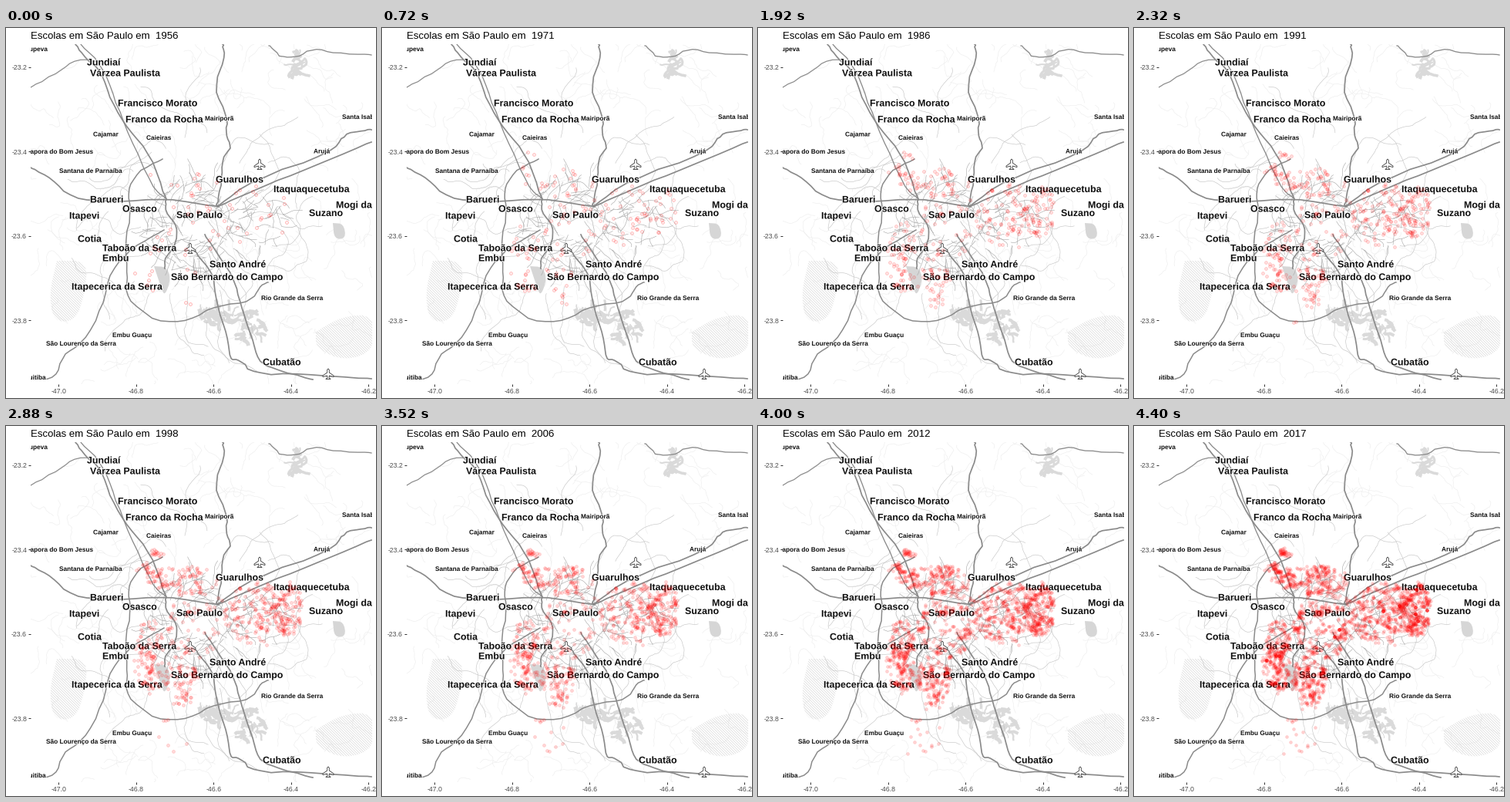
These frames come from a looping animation (480 by 480 pixels, 4.48 s). A matplotlib script:

```python
import numpy as np
import matplotlib.pyplot as plt
from matplotlib.animation import FuncAnimation
from matplotlib.collections import LineCollection
from matplotlib.patches import Polygon
from matplotlib.patheffects import withStroke

SIZE, DPI = 480, 72
LEFT, RIGHT, TOP, BOTTOM = 32, 474.5, 21, 462
FRAMES, STEP = 56, 80
CENTER = np.array([246, 258])
rng = np.random.default_rng(11)

plt.rcParams["font.family"] = "Liberation Sans"
plt.rcParams["hatch.linewidth"] = 0.6

fig = plt.figure(figsize=(SIZE / DPI, SIZE / DPI), dpi=DPI, facecolor="white")
ax = fig.add_axes([LEFT / SIZE, 1 - BOTTOM / SIZE,
                   (RIGHT - LEFT) / SIZE, (BOTTOM - TOP) / SIZE])
ax.set(xlim=(LEFT, RIGHT), ylim=(BOTTOM, TOP))
ax.spines[:].set_visible(False)
ax.set_xticks([68.3 + 100.5 * i for i in range(5)],
              [f"{-47 + 0.2 * i:.1f}" for i in range(5)])
ax.set_yticks([50.5 + 109.6 * i for i in range(4)],
              [f"{-23.2 - 0.2 * i:.1f}" for i in range(4)])
ax.tick_params(length=2.7, width=1, color="#333333", pad=2.2,
               labelsize=8.8, labelcolor="#4d4d4d")
title = fig.text(LEFT / SIZE, 1 - 14 / SIZE, "", size=13.2, color="black")


def smooth(pts, rounds=2):
    """Chaikin corner cutting that keeps both ends."""
    for _ in range(rounds):
        a, b = pts[:-1], pts[1:]
        mid = np.stack([0.75 * a + 0.25 * b, 0.25 * a + 0.75 * b], 1).reshape(-1, 2)
        pts = np.vstack([pts[:1], mid, pts[-1:]])
    return pts


def points(xy):
    return np.array(xy, float).reshape(-1, 2)


def highway(*xy, lw=1.7):
    pts = smooth(points(xy))
    pts[1:-1] += rng.normal(0, 0.4, (len(pts) - 2, 2))
    ax.plot(*pts.T, color="#8a8a8a", lw=lw, zorder=4, solid_joinstyle="round")


def area(*xy, **style):
    ax.add_patch(Polygon(smooth(points(xy + xy[:2])), lw=0, zorder=2, **style))


def walk(start, heading, steps, turn):
    angles = heading + np.cumsum(rng.normal(0, turn, steps))
    moves = 3 * np.c_[np.cos(angles), np.sin(angles)]
    return np.vstack([start, start + np.cumsum(moves, 0)])


def lines(walks, color, lw, z):
    ax.add_collection(LineCollection(walks, colors=color, linewidths=lw, zorder=z))


def disk(n, x, y, rx, ry):
    a, r = rng.uniform(0, 2 * np.pi, n), np.sqrt(rng.uniform(0, 1, n))
    return np.c_[x + rx * r * np.cos(a), y + ry * r * np.sin(a)]


def reservoir(x, y, rx, ry, arms):
    for p in disk(arms, x, y, rx, ry):
        arm = walk(p, rng.uniform(0, 2 * np.pi), 5, 0.5)
        lines([arm], "#dadada", rng.uniform(1.5, 5), 2)


def plane(x, y):
    half = points([0, -7, 1.3, -5.5, 1.3, -2, 7, 2, 7, 3.6, 1.3, 2, 1, 4.8, 3.2, 6.5, 0, 6.5])
    pts = np.vstack([half, half[::-1] * [-1, 1]]) + [x, y]
    ax.add_patch(Polygon(pts, fc="white", ec="#333333", lw=0.8, zorder=5))


# back roads, outskirts lanes, then the city's spokes and cross streets
lines([walk(p, rng.uniform(0, 6.3), 16, 0.45) for p in disk(200, 253, 241, 270, 270)],
      "#ededed", 0.6, 1)
for a in np.linspace(0, 2 * np.pi, 26, endpoint=False):
    way = np.array([np.cos(a), np.sin(a)])
    lines([walk(CENTER + rng.uniform(70, 130) * way, a, 34, 0.25)], "#c4c4c4", 0.6, 3)
streets = []
for p in np.vstack([disk(140, *CENTER, 66, 62), disk(28, 322, 248, 40, 36)]):
    spoke = np.arctan2(*(p - CENTER)[::-1])
    streets.append(walk(p, spoke + rng.choice([0, np.pi / 2]), rng.integers(4, 12), 0.2))
lines(streets, "#aaaaaa", 0.6, 3)

# parks and reservoirs
park = dict(fc="none", ec="#d4d4d4", hatch="\\" * 7)
area(66, 302, 106, 302, 102, 345, 90, 380, 62, 381, 56, 345, **park)
area(402, 394, 436, 374, 478, 372, 478, 418, 440, 432, 402, 416, **park)
area(192, 309, 208, 310, 214, 325, 206, 348, 201, 336, fc="#d6d6d6")
area(424, 253, 438, 254, 441, 273, 426, 274, fc="#d6d6d6")
reservoir(276, 374, 28, 8, 34)
reservoir(317, 383, 14, 22, 26)
reservoir(378, 48, 9, 16, 16)

# highways
highway(90, 21, 103, 40, 124, 55, 136, 96, 160, 132, 188, 166, 208, 222)
highway(97, 21, 126, 50, 140, 90, 160, 140, 190, 207, 207, 221, lw=1.3)
highway(32, 77, 70, 56, 90, 40, 128, 44, lw=1.2)
highway(32, 181, 60, 196, 84, 221, 140, 226, 208, 221, 275, 232)
highway(203, 170, 170, 186, 158, 212, 163, 236, 154, 280, 158, 322, 155, 350,
        195, 382, 238, 380, 272, 360, 320, 355, 328, 336, 340, 330, lw=1.5)
highway(281, 21, 284, 40, 269, 78, 288, 116, 285, 138, 293, 154, 281, 168, 280, 200, 273, 231)
highway(274, 231, 320, 197, 424, 161, 436, 140, 452, 134, 474, 132)
highway(275, 232, 320, 211, 372, 190, 474, 148)
highway(341, 23, 357, 38, 378, 38, 398, 26, 428, 33, 474, 35, lw=1.3)
highway(205, 262, 165, 284, 136, 314, 125, 362, 100, 410, 72, 424, 66, 455, 32, 456, lw=1.5)
highway(208, 222, 206, 238, 223, 258, 220, 282, 206, 298, 206, 312)
highway(245, 290, 270, 320, 272, 355, 288, 400, 290, 430, 304, 430, 320, 449, 383, 449, 474, 455)
highway(258, 268, 297, 326, 303, 358, 320, 402, 327, 432, 345, 442, 398, 456)


def label(x, y, text, size=12.4, ha="left"):
    ax.text(x, y + 0.36 * size, text, size=size, weight="bold", color="#111111", ha=ha,
            va="baseline", zorder=6, clip_on=True,
            path_effects=[withStroke(linewidth=1.6, foreground="white")])


for spot in [(329, 177), (239, 286), (418, 449)]:
    plane(*spot)
for x, y, name in [
        (105, 44, "Jundiaí"), (109, 58, "Várzea Paulista"), (145, 97, "Francisco Morato"),
        (155, 118, "Franco da Rocha"), (272, 196, "Guarulhos"),
        (347, 208.5, "Itaquaquecetuba"), (428, 229, "Mogi das Cruzes"),
        (393, 239.5, "Suzano"), (109, 222, "Barueri"), (151, 234, "Osasco"),
        (82, 243, "Itapevi"), (221, 242, "Sao Paulo"), (93, 273, "Cotia"),
        (125, 285, "Taboão da Serra"), (125, 298, "Embu"), (264, 306, "Santo André"),
        (214, 322.5, "São Bernardo do Campo"), (85, 335, "Itapecerica da Serra"),
        (333, 433, "Cubatão")]:
    label(x, y, name)
for x, y, name in [
        (258, 117, "Mairiporã"), (436, 115, "Santa Isabel"), (113, 137.5, "Cajamar"),
        (182, 142, "Caieiras"), (399, 159.5, "Arujá"), (69, 185, "Santana de Parnaíba"),
        (331, 350, "Rio Grande da Serra"), (138, 398, "Embu Guaçu"),
        (52, 409, "São Lourenço da Serra")]:
    label(x, y, name, 8.3)
for x, y, name in [(54, 27, "Itupeva"), (113, 160, "Pirapora do Bom Jesus"),
                   (52, 453, "Juquitiba")]:
    label(x, y, name, 8.3, "right")

# share of schools open by each key year, downtown and at the edge
YEARS = [1956, 1980, 1991, 1998, 2006, 2012, 2017]
CORE = np.array([0.07, 0.14, 0.16, 0.18, 0.21, 0.70, 1])
EDGE = np.array([0.02, 0.11, 0.25, 0.38, 0.48, 0.80, 1])


def district(n, *ellipse):
    """Schools gathered around neighbourhood centres inside an ellipse."""
    hubs = disk(n // 3, *ellipse)
    return hubs[rng.integers(len(hubs), size=n)] + rng.normal(0, 2.2, (n, 2))


def opening(spots):
    edge = np.clip((np.hypot(*(spots - CENTER).T) - 25) / 50, 0, 1)
    return [np.ceil(np.interp(u, CORE + e * (EDGE - CORE), YEARS))
            for u, e in zip(rng.uniform(0, 1, len(spots)), edge)]


city = np.vstack([
    district(290, 230, 199, 50, 18), district(40, 194, 164, 7, 4),
    district(50, 183, 184, 13, 7), district(430, 326, 243, 45, 40),
    district(330, 364, 237, 20, 36), district(330, 186, 298, 17, 46),
    district(270, 227, 330, 20, 38), district(330, 246, 255, 42, 46)])
south = np.c_[rng.normal(216, 13, 18), rng.uniform(380, 430, 18)]
shared = np.repeat(rng.choice(city, 14), 5, axis=0)
schools = np.vstack([
    np.c_[city, opening(city)],
    np.c_[south, np.linspace(1989, 2012, 18)],
    np.c_[shared, np.tile(np.arange(2013, 2018), 14)]])
schools = schools[np.argsort(schools[:, 2], kind="stable")]
marks = ax.scatter([], [], s=15, linewidths=0.8, zorder=8)


def draw(i):
    year = min(1956 + round(i * 5 / 3), 1962 + i)
    title.set_text(f"Escolas em São Paulo em  {year}")
    count = np.searchsorted(schools[:, 2], year, "right")
    marks.set_offsets(schools[:count, :2])
    age = (year - YEARS[0]) / (YEARS[-1] - YEARS[0])
    marks.set_facecolor((1, 0, 0, 0.05 + 0.13 * age))
    marks.set_edgecolor((1, 0, 0, 0.30 - 0.20 * age))
    return marks, title


anim = FuncAnimation(fig, draw, frames=FRAMES, interval=STEP, repeat=True)
plt.show()
```
